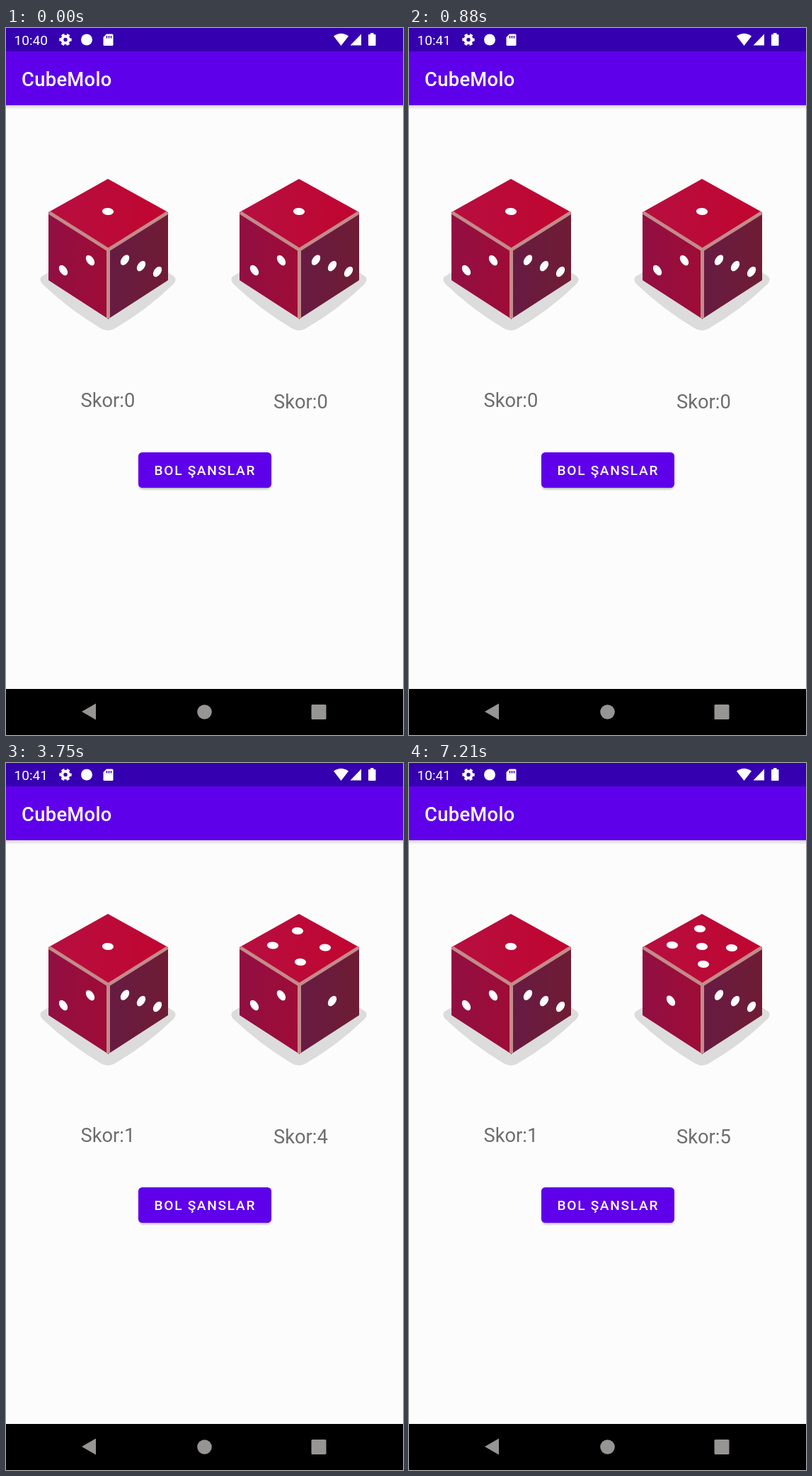
Recreate the animation shown at these times as an HTML page. Size 561 by 998 pixels, loop 8000 ms.

```html
<!DOCTYPE html>
<html lang="tr">
<head>
<meta charset="utf-8">
<title>CubeMolo</title>
<style>
  html, body { margin: 0; width: 100%; height: 100%; overflow: hidden; background: #fcfcfc; }
  svg { display: block; width: 561px; height: 998px; }
  text { font-family: Roboto, sans-serif; fill: #fff; }
  .score { font-size: 27.3px; fill: #6d6d6d; }
  .medium { font-weight: 500; }
</style>
</head>
<body>
<svg viewBox="0 0 561 998">
  <defs>
    <linearGradient id="top" x2="1"><stop stop-color="#b60f41"/><stop offset="1" stop-color="#c1052f"/></linearGradient>
    <linearGradient id="left" x2="1"><stop stop-color="#910f43"/><stop offset="1" stop-color="#9f0c36"/></linearGradient>
    <linearGradient id="right" x2="1"><stop stop-color="#671b43"/><stop offset="1" stop-color="#6f1c34"/></linearGradient>
    <linearGradient id="fade" x2="0" y2="1"><stop stop-opacity=".16"/><stop offset="1" stop-opacity="0"/></linearGradient>
    <filter id="soft" x="-10%" y="-20%" width="120%" height="150%"><feGaussianBlur stdDeviation="1.6"/></filter>
    <clipPath id="buttonClip"><rect x="187" y="599" width="188" height="50" rx="5.5"/></clipPath>
    <g id="cube">
      <path fill="#dcdcdc" d="M60 345L50 351Q46 356 52 362Q90 398 134 424Q144 430 154 424Q199 398 236 362Q242 356 238 351L229 345Z"/>
      <path fill="url(#left)" d="M60 260L145 311V411L60 356Z"/>
      <path fill="url(#right)" d="M144 311L229 260V356L144 411Z"/>
      <path fill="url(#top)" d="M144 213L229 260L144 311L60 260Z"/>
      <path fill="none" stroke="#c38b8a" stroke-width="5" d="M61 260.5L144.500 313L228.500 260.500M144.500 312V410"/>
    </g>
  </defs>

  <rect width="561" height="998" fill="#fcfcfc"/>
  <rect y="109" width="561" height="6" fill="url(#fade)"/>
  <rect width="561" height="109" fill="#5f00eb"/>
  <rect width="561" height="33" fill="#3500b0"/>

  <text id="clock" x="11.500" y="24" font-size="19.100"></text>
  <g fill="#fff">
    <circle cx="84" cy="16.500" r="4.700" fill="none" stroke="#fff" stroke-width="4"/>
    <circle cx="84" cy="16.500" r="7.200" fill="none" stroke="#fff" stroke-width="3" stroke-dasharray="4.200 3.340" stroke-dashoffset="2.100"/>
    <circle cx="114" cy="16.500" r="8"/>
    <path d="M142 8.500H150Q151.500 8.500 151.500 10V23.500Q151.500 25 150 25H139Q137.500 25 137.500 23.500V13Z"/>
    <path stroke="#3500b0" stroke-width="1.500" d="M142.500 11V14.500M145.500 11V14.500M148.500 11V14.500"/>
    <path d="M463 11.500Q473.500 4 484 11.500L473.500 25Z"/>
    <path d="M486.500 24.500H502V8.500Z"/>
    <path d="M515 7H519.500V9H521.500Q522.500 9 522.500 10V24Q522.500 25 521.500 25H513Q512 25 512 24V10Q512 9 513 9H515Z"/>
  </g>
  <text class="medium" x="22" y="81.500" font-size="27.300" letter-spacing=".34">CubeMolo</text>

  <use href="#cube"/>
  <use href="#cube" x="270"/>
  <g id="leftPips" fill="#fff"></g>
  <g id="rightPips" fill="#fff" transform="translate(270 0)"></g>
  <text id="leftScore" class="score" x="105.500" y="535"></text>
  <text id="rightScore" class="score" x="378" y="536.500"></text>

  <rect x="188" y="601" width="186" height="50" rx="5.500" opacity=".28" filter="url(#soft)"/>
  <rect x="187" y="599" width="188" height="50" rx="5.500" fill="#5f00eb"/>
  <g clip-path="url(#buttonClip)"><circle id="ripple" cx="290" cy="626" r="0" fill="#fff" opacity="0"/></g>
  <text class="medium" x="209.500" y="631" font-size="19.100" letter-spacing="1.700">BOL ŞANSLAR</text>

  <rect y="933" width="561" height="65"/>
  <g fill="#969593">
    <path d="M107 965L127 953.500V976.500Z"/>
    <circle cx="280.500" cy="965.500" r="10.300"/>
    <rect x="431.500" y="955" width="21" height="21" rx="1.500"/>
  </g>
</svg>
<script>
const LOOP = 8000;
const CLOCK_TICK = 210;
const presses = [3140, 5760];
const steps = [
  { at: 0, score: [0, 0], faces: [1, 1] },
  { at: 3240, score: [1, 4], faces: [1, 4] },
  { at: 5840, score: [1, 5], faces: [1, 5] }
];

const leftTwo = [[81, 342], [119, 328]];
const rightThree = [[168, 327.5], [191, 336], [214, 344]];
const dice = {
  1: { top: [[144, 259]], left: leftTwo, right: rightThree },
  4: { top: [[142, 237], [107, 257.5], [181, 260.5], [146, 281]], left: leftTwo, right: [[191, 336]] },
  5: { top: [[141, 234], [102, 257], [144, 259], [186, 261], [146, 284]], left: [[100, 335.5]], right: rightThree }
};
const tilt = { top: 4, left: 55, right: -55 };

const el = id => document.getElementById(id);
const clamp = v => Math.max(0, Math.min(1, v));

function pips(face) {
  return Object.entries(dice[face]).map(([side, points]) => points.map(([x, y]) =>
    `<ellipse rx="8.1" ry="5" transform="translate(${x} ${y}) rotate(${tilt[side]})"/>`
  ).join("")).join("");
}

let shown;
function showStep(step) {
  if (step === shown) return;
  shown = step;
  ["left", "right"].forEach((side, i) => {
    el(side + "Pips").innerHTML = pips(step.faces[i]);
    el(side + "Score").textContent = "Skor:" + step.score[i];
  });
}

function showRipple(t) {
  const start = presses.filter(p => p <= t).pop();
  const age = start === undefined ? Infinity : t - start;
  const grow = 1 - (1 - clamp(age / 225)) ** 2;
  const alpha = clamp(age / 75) * (1 - clamp((age - 220) / 250));
  el("ripple").setAttribute("r", 30 + 85 * grow);
  el("ripple").setAttribute("opacity", 0.15 * alpha);
}

function draw(now) {
  const t = now % LOOP;
  el("clock").textContent = t < CLOCK_TICK ? "10:40" : "10:41";
  showStep(steps.filter(s => s.at <= t).pop());
  showRipple(t);
}

const origin = performance.now();
function tick() {
  draw(performance.now() - origin);
  requestAnimationFrame(tick);
}
tick();
</script>
</body>
</html>
```
